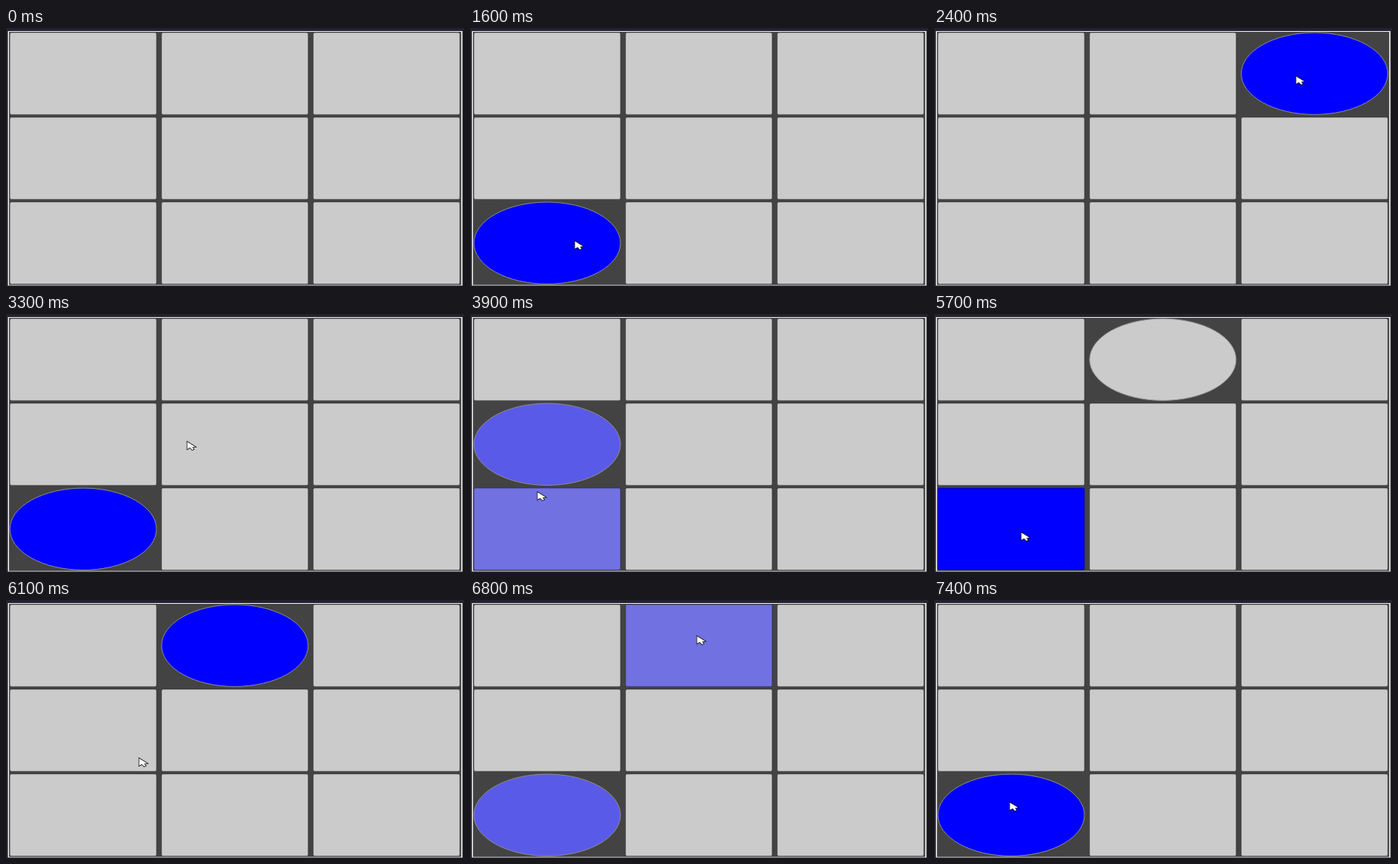
Write an HTML page with a canvas that moves like this. It is 600x338 px and loops after 7.5 s.

```html
<!DOCTYPE html>
<html>
<head>
<meta charset="utf-8">
<style>
html, body { margin: 0; width: 600px; height: 338px; overflow: hidden; background: #25222f; }
canvas { display: block; }
</style>
</head>
<body>
<canvas id="stage" width="600" height="338"></canvas>
<script>
const ctx = document.getElementById('stage').getContext('2d');
const LOOP = 7500, STEP = 100, FADE = 180, REACT = 200, TRAVEL = 520;
const NONE = -1, TOP_MID = 1, TOP_RIGHT = 2, MID_LEFT = 3, LOW_LEFT = 6;

// The pointer clicks at (x, y); the ellipse then jumps to `cell`.
const click = (time, x, y, cell) => ({ time, x, y, cell });
const clicks = [
  click(0, 0, 29, NONE),
  click(800, 137, 279, LOW_LEFT),
  click(1700, 137, 279, TOP_RIGHT),
  click(2800, 475, 62, LOW_LEFT),
  click(3800, 88, 233, MID_LEFT),
  click(4700, 113, 171, LOW_LEFT),
  click(5700, 114, 286, TOP_MID),
  click(6700, 297, 47, LOW_LEFT),
  click(LOOP, 98, 266, NONE)
];

const arrow = new Path2D('M0 0V9.5L3.5 7.5L6.5 10.5L8.5 9.7L6.5 7L10.5 6.5Z');
const mix = (a, b, k) => a + (b - a) * k;
const clamp = u => Math.max(0, Math.min(1, u));
const smooth = u => u * u * (3 - 2 * u);

function drawFrame() {
  ctx.fillStyle = '#25222f';
  ctx.fillRect(0, 0, 600, 338);
  ctx.fillStyle = '#f2f2f2';
  ctx.fillRect(2.5, 4, 595.5, 333.4);
  ctx.fillStyle = '#434343';
  ctx.fillRect(4, 5, 592.4, 331.6);
}

function drawCell(i, round, blue) {
  const x = 4.6 + i % 3 * 198.7, y = 5.6 + Math.floor(i / 3) * 111;
  const w = 193, h = 108.3;
  const rg = mix(203, 0, blue), b = mix(203, 255, blue);
  ctx.beginPath();
  if (round) ctx.ellipse(x + w / 2, y + h / 2, w / 2 - .5, h / 2 - .5, 0, 0, 7);
  else ctx.roundRect(x + .5, y + .5, w - 1, h - 1, 2);
  ctx.fillStyle = `rgb(${rg},${rg},${b})`;
  ctx.fill();
  ctx.lineWidth = 1;
  ctx.strokeStyle = round ? '#8c8c8c' : 'rgba(0,0,0,.3)';
  ctx.stroke();
}

function drawPointer(x, y) {
  ctx.save();
  ctx.translate(Math.round(x) + .5, Math.round(y) + .5);
  ctx.lineWidth = 1.6;
  ctx.strokeStyle = '#111';
  ctx.stroke(arrow);
  ctx.fillStyle = '#fff';
  ctx.fill(arrow);
  ctx.restore();
}

function draw(t) {
  const n = clicks.findLastIndex(c => c.time <= t);
  const last = clicks[n], next = clicks[n + 1];
  const left = n > 0 ? clicks[n - 1].cell : NONE;
  const age = t - last.time, fade = clamp(age / FADE);

  drawFrame();
  for (let i = 0; i < 9; i++) {
    const active = i === last.cell;
    drawCell(i, active, active ? fade : i === left ? 1 - fade : 0);
  }
  if (t > 0) {
    const k = smooth(clamp((age - REACT) / TRAVEL));
    drawPointer(mix(last.x, next.x, k), mix(last.y, next.y, k));
  }
}

const start = performance.now();
function tick() {
  const t = (performance.now() - start) % LOOP;
  draw(Math.floor(t / STEP) * STEP);
  requestAnimationFrame(tick);
}
tick();
</script>
</body>
</html>
```
